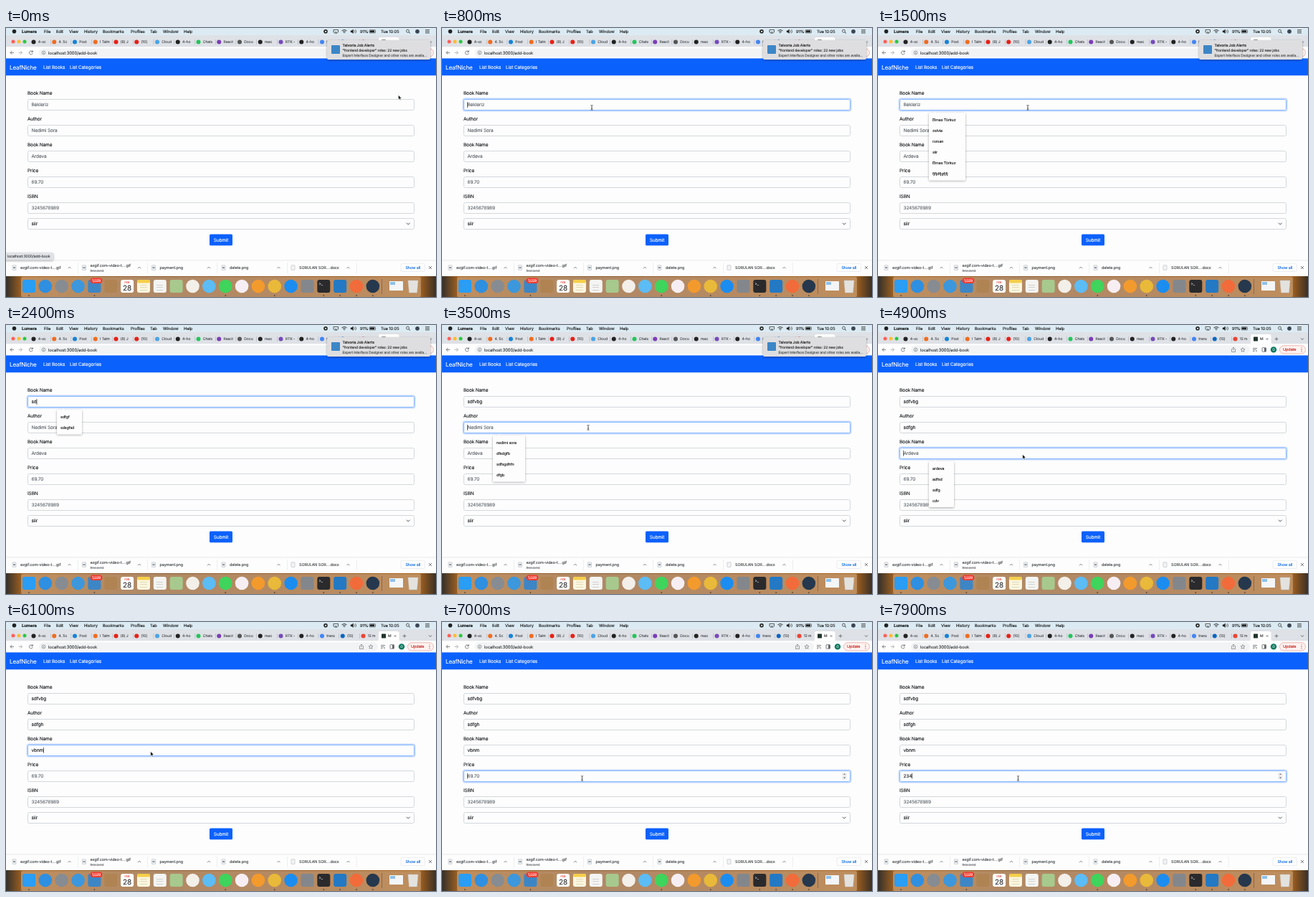
Write an HTML page that moves like this. It is 600 px wide and 375 px high and loops after 8 s.

```html
<!DOCTYPE html>
<html lang="en">
<meta charset="utf-8">
<title>Add book</title>
<style>
html, body { margin: 0; width: 100%; height: 100%; overflow: hidden; background: #fdfdfd }
svg { display: block; width: 100vw; height: 100vh }
text {
  font-family: Inter, Roboto, "Liberation Sans", sans-serif;
  letter-spacing: -.02em; white-space: pre; text-rendering: geometricPrecision;
}
</style>
<svg id="stage" viewBox="0 0 600 375">
  <defs>
    <linearGradient id="wall">
      <stop offset="0" stop-color="#33302c"/><stop offset=".04" stop-color="#a8641f"/>
      <stop offset=".35" stop-color="#8a5a30"/><stop offset=".7" stop-color="#9a5d26"/>
      <stop offset=".96" stop-color="#a8641f"/><stop offset="1" stop-color="#3a2f25"/>
    </linearGradient>
    <filter id="shade" x="-20%" y="-20%" width="140%" height="150%">
      <feDropShadow dx="0" dy="1" stdDeviation="1.5" flood-opacity=".35"/>
    </filter>
  </defs>
  <g id="base"></g><g id="live"></g>
</svg>
<script>
const $ = id => document.getElementById(id);
const BLUE = '#0b61fb', INK = '#16191c', GREY = '#5f6368';

// y is the vertical middle of the line; the thin stroke firms up small type
const T = (x, y, s, size = 6.5, fill = INK, more = '') =>
  `<text x="${x}" y="${y + size * .36}" font-size="${size}" fill="${fill}" stroke="${fill}" stroke-width=".12" ${more}>${s}</text>`;
const R = (x, y, w, h, fill, r = 0, more = '') =>
  `<rect x="${x}" y="${y}" width="${w}" height="${h}" rx="${r}" fill="${fill}" ${more}/>`;
const C = (x, y, r, fill, more = '') => `<circle cx="${x}" cy="${y}" r="${r}" fill="${fill}" ${more}/>`;
const P = (d, stroke = GREY, w = .8, fill = 'none', more = '') =>
  `<path d="${d}" stroke="${stroke}" stroke-width="${w}" fill="${fill}" ${more}/>`;
const loop = (list, f) => list.map(f).join('');

function menuBar() {
  const items = [[53, 'File'], [70, 'Edit'], [88, 'View'], [109, 'History'], [135, 'Bookmarks'],
    [174, 'Profiles'], [201, 'Tab'], [219, 'Window'], [248, 'Help'], [494, '91%'], [523, 'Tue 10:05']];
  return R(0, 0, 600, 10, '#dcebf3') + C(11.5, 4.8, 2.8, '#222') +
    T(22, 4.8, 'Lumera', 5.9, '#111', 'font-weight="700"') +
    loop(items, ([x, s]) => T(x, 4.8, s, 5.8, '#111')) +
    C(446, 4.8, 2.8, '#222') + P('M445.2 3.4L447.8 4.8 445.2 6.2Z', 'none', 0, '#fff') +
    P('M458 6H457V2.5H463.5V6H462.5M458.5 7.2L460.2 5 462 7.2Z', '#222', .7) +
    P('M468.5 3.8Q472 1 475.5 3.8M470 5.4Q472 3.8 474 5.4M471.3 6.7H472.7', '#222', .9) +
    P('M481 3.7H482.5L484.5 2V7.5L482.5 6H481Z', '#222', .4, '#222') +
    P('M486 3.2Q487.5 4.8 486 6.4M487.5 2.2Q490 4.8 487.5 7.4', '#222', .6) +
    R(507, 2.7, 8.5, 4.2, 'none', .8, 'stroke="#222" stroke-width=".6"') + R(507.8, 3.4, 6.3, 2.8, '#222') +
    C(560.5, 4.2, 2, 'none', 'stroke="#222" stroke-width=".7"') + P('M562 5.7L564 7.6', '#222', .9) +
    C(574, 4.8, 2.9, '#3b4554') + P('M585 2.7H591M585 4.8H591M585 6.9H591', '#222', .8);
}

function tabs() {
  const names = ['4-sc', '4. Sc', 'Post', 'I Talm', '(8) J', '(10)', 'Cloud', '4-ho', 'Chats', 'React',
    'Docu', 'reac', 'RTK -', '4-ho', 'trans', '(12)', '12 m'];
  const tints = ['#222', '#ef6c1f', '#1683d8', '#ef6c1f', '#e62117', '#e62117', '#4aa3e8', '#222', '#25c55b',
    '#7a3db8', '#555', '#222', '#764abc', '#222', '#4285f4', '#0a66c2', '#ea4335'];
  const step = 28.75;
  return R(0, 10, 600, 16.5, '#dee1e6') +
    loop(['#ff5f57', '#febc2e', '#28c840'], (c, i) => C(10 + i * 8, 19, 2.5, c)) +
    loop(names, (s, i) => C(38.5 + i * step, 19.5, 3, tints[i]) + T(44.8 + i * step, 19.5, s, 5.1, '#45494d') +
      (i < 16 ? R(62 + i * step, 16, .4, 7, '#9aa0a6') : '')) +
    P('M517.5 26.5Q520 26.5 520 24V15.5Q520 13 522.5 13H546Q548.5 13 548.5 15.5V24Q548.5 26.5 551 26.5Z', 'none', 0, '#fff') +
    R(524, 16.5, 6, 6, '#20332c', .6) + T(533, 19.5, 'M', 5.1, '#333') +
    P('M541.5 18L544.5 21M544.5 18L541.5 21', '#555', .6) +
    P('M553.5 19.5H558.5M556 17V22', '#555', .7) + P('M590 18.5L592 20.5 594 18.5', '#444', .8);
}

function toolBar() {
  return R(0, 26.3, 600, 16.4, '#fdfdfd') + R(46, 28.5, 473, 11.8, '#f1f3f4', 5.9) +
    P('M11 34.4H6M8.3 32L6 34.4 8.3 36.8', GREY, .8) + P('M17.5 34.4H22.5M20.2 32L22.5 34.4 20.2 36.8', '#a5a8ac', .8) +
    P('M37 33A2.5 2.5 0 1 0 37.3 35.2M37.4 31.3V33.4H35.2', GREY, .8) +
    C(52.5, 34.4, 2.4, 'none', `stroke="${GREY}" stroke-width=".6"`) + P('M52.5 34V35.8M52.5 32.9V33.4', GREY, .7) +
    T(59, 34.4, 'localhost:3000/add-book', 5.9, '#303438') +
    P('M494.5 33.5H493.5V37.5H498.5V33.5H497.5M496 35.5V31.2M494.6 32.5L496 31 497.4 32.5', GREY, .6) +
    P('M509 31.5L509.9 33.5 512 33.7 510.4 35.1 510.9 37.2 509 36.1 507.1 37.2 507.6 35.1 506 33.7 508.1 33.5Z', GREY, .6) +
    P('M523 32.5H529M523 34.5H527M523 36.5H525.5M528 34.5V37.5', GREY, .8) +
    R(536, 31.7, 5.5, 5.5, 'none', .6, `stroke="${GREY}" stroke-width=".8"`) + R(539, 32, 2.2, 5, GREY) +
    C(552, 34.4, 4.2, '#0b7a60') + T(552, 34.4, 'O', 4.6, '#fff', 'text-anchor="middle"') +
    R(560.5, 28.8, 36, 11.2, '#fdf3f1', 5.6, 'stroke="#e08a80" stroke-width=".6"') +
    T(565, 34.4, 'Update', 5.6, '#c5221f') + loop([32, 34.4, 36.8], y => C(591, y, .6, '#c5221f'));
}

function downloads() {
  const files = [[20, 'ezgif.com-video-t....gif'], [117.5, 'ezgif.com-video-t....gif'], [214.5, 'payment.png'],
    [312, 'delete.png'], [409, 'SORULAN SOR....docx']];
  return R(0, 324, 600, 22, '#fdfdfd') + R(0, 323.7, 600, .5, '#d0d3d6') +
    loop(files, ([x, s], i) => R(x - 11, 330.8, 5, 6.6, '#f3f4f5', .4, 'stroke="#a9adb2" stroke-width=".5"') +
      (i < 4 ? R(x - 10, 333, 3, 2.2, '#8d9aa5') : '') +
      T(x, i == 1 ? 330.6 : 334.2, s, 5.45, '#3c4043') + (i == 1 ? T(x, 338.8, 'Removed', 4.4, GREY) : '') +
      P(`M${x + 66.5} 335.2l2 -2 2 2`, GREY, .8) + R(x + 80, 327, .4, 15, '#d5d8db')) +
    R(551, 328.3, 33.5, 11.2, '#fdfdfd', 2, 'stroke="#dadce0" stroke-width=".5"') +
    T(557.5, 334, 'Show all', 5.4, '#1a73e8', 'font-weight="500"') +
    P('M590 332L594 336M594 332L590 336', GREY, .8);
}

function dock() {
  // a leading "o" makes the tile round
  const tints = ['#2a9df4', 'o#2f8fe0', 'o#878c92', 'o#3c97dc', '#3d86c6', '#b08352', '#fff', '#fbf6e0', '#f4f4f2', '#a7c98d',
    'o#f3efe9', 'o#5cbcf5', 'o#3fd45c', 'o#f6eef2', 'o#f39a2d', 'o#e9b93a', 'o#1b8df0', '#83878c', '#2a2a2c', '#2379c4',
    'o#f26b3a', 'o#26384d'];
  const running = [0, 4, 12, 15, 18, 19, 20, 21];
  return R(0, 346, 600, 29, 'url(#wall)') + R(21, 347, 558, 28, '#d6b79c', 2, 'opacity=".5"') +
    loop(tints, (c, i) => {
      const x = 32 + i * 22.85;
      return (c[0] == 'o' ? C(x, 360, 9.3, c.slice(1)) : R(x - 9, 351, 18, 18, c, 3)) +
        (running.includes(i) ? C(x, 373, .8, '#222') : '');
    }) +
    R(117.5, 348.5, 17, 7.5, '#f23b30', 3.7) + T(126, 352.2, '1,029', 5, '#fff', 'text-anchor="middle"') +
    T(169, 354.5, 'FEB', 3.8, '#e0352b', 'text-anchor="middle"') +
    T(169, 362, '28', 10, '#333', 'text-anchor="middle"') +
    R(183, 351, 18, 4.5, '#f5cf4b', 2) +
    loop([358, 361.5, 365], y => R(187, y, 10, .5, '#c9bd8b') + R(210, y, 9, .5, '#aaa')) +
    T(436.5, 356, '&gt;_', 5, '#eee') +
    R(524, 350, .5, 21, '#5d4640') + R(535, 353, 19, 13, '#f3f5f7', .6) + R(536, 354, 7, 4, '#8fc0ea') +
    P('M561 352H575L573.5 369H562.5Z', '#c9cfd3', .5, '#e8ecee', 'opacity=".9"');
}

const rows = [['Book Name', 'Bekleriz'], ['Author', 'Nedimi Sora'], ['Book Name', 'Ardeva'],
  ['Price', '69.70'], ['ISBN', '3245678989']];
const rowY = i => 107.1 + i * 35.85;

// borders sit on whole pixels
function field(y, focus) {
  const top = Math.round(y - 7.9) + .5;
  return (focus ? R(29.3, top - 1.2, 541.4, 17.4, 'none', 3, 'stroke="#c2d8fe" stroke-width="1.6"') : '') +
    R(30.5, top, 539, 15, '#fdfdfd', 2, `stroke="${focus ? '#86b7fe' : '#d3d8dc'}"`);
}

$('base').innerHTML = R(0, 0, 600, 375, '#fdfdfd') + menuBar() + tabs() + toolBar() +
  R(0, 42.4, 600, 23.8, BLUE) + T(5, 54.6, 'LeafNiche', 8.1, '#fff') +
  T(52, 54.6, 'List Books', 6.5, '#fff') + T(89, 54.6, 'List Categories', 6.5, '#fff') +
  loop(rows, ([label], i) => T(30, rowY(i) - 16.1, label)) +
  field(272.8) + T(35.5, 272.8, 'siir') + P('M559 271.7L561.3 274 563.6 271.7', '#343a40', .9) +
  R(284, 287.5, 32, 15.8, BLUE, 1.6) + T(300, 295.4, 'Submit', 6.5, '#fff', 'text-anchor="middle"') +
  downloads() + dock();

// hints[n] = popup width and suggestions once n letters are typed
const edits = [
  { row: 0, at: 800, text: 'sdfvbg', keys: [2000, 2200, 2500, 2650, 2800, 2950], open: 1000, hints: [
    [51, 'Elmas Törkuz', 'zelvia', 'roman', 'siir', 'Elmas Törkuz', 'fjfjdfjgfjfj'],
    [35, 'siir', 'sdfgf', 'sdsgfsd'], [35, 'sdfgf', 'sdsgfsd'], [35, 'sdfgf']] },
  { row: 1, at: 3300, text: 'sdfgh', keys: [3750, 3900, 4050, 4200, 4350], open: 3400, hints: [
    [45, 'nedimi sora', 'dfsdgfb', 'sdfsgdhfn', 'dfgb'], [45, 'sdfsgdhfn'], [45, 'sdfsgdhfn'], [45, 'sdfsgdhfn']] },
  { row: 2, at: 4750, text: 'vbnm', keys: [5250, 5450, 5650, 5850], open: 4800, hints: [
    [35, 'ardeva', 'adfsd', 'sdfg', 'cdv']] },
  { row: 3, at: 6700, text: '234', keys: [7250, 7450, 7650], hints: [] }
];

// time, x, y
const path = [[0, 547.5, 93.5], [150, 547.5, 93.5], [700, 209, 111], [3000, 209, 111], [3250, 204, 143],
  [4400, 204, 143], [4650, 201.8, 180.5], [6250, 201.8, 180.5], [6550, 195.5, 218], [8000, 195.5, 218]];
const between = (t, a, b) => t >= a && t < b;
const ease = p => p * p * (3 - 2 * p);

function pointer(t) {
  if (between(t, 2000, 3000) || between(t, 3750, 4400)) return '';
  const k = path.findIndex(p => p[0] > t), [t0, x0, y0] = path[k - 1], [t1, x1, y1] = path[k];
  const p = ease((t - t0) / (t1 - t0)), at = `transform="translate(${x0 + (x1 - x0) * p} ${y0 + (y1 - y0) * p})"`;
  const beam = between(t, 600, 4400) || t > 6480;
  return beam ? P('M-1.5 -3.4Q0 -3.4 0 -2.4V2.4Q0 3.4 -1.5 3.4M1.5 -3.4Q0 -3.4 0 -2.4M0 2.4Q0 3.4 1.5 3.4M-.8 .9H.8', '#222', .7, 'none', at)
    : P('M0 0V6.2L1.4 4.9 2.4 7.1 3.4 6.7 2.4 4.6H4.4Z', '#fff', .5, '#000', at);
}

function hintList(y, [w, ...items]) {
  const top = y + 11.2, h = items.length * 15 + 4;
  return R(71, top, w, h, '#fdfdfd', 1.2, 'filter="url(#shade)"') +
    P(`M77.5 ${top + .2}L80 ${top - 2.3} 82.5 ${top + .2}`, '#dcdfe2', .4, '#fdfdfd') +
    loop(items, (s, i) => T(76, top + 9.7 + i * 15, s, 5.3, '#111'));
}

function notice(t) {
  const p = Math.min(1, Math.max(0, (t - 4350) / 350));
  if (p == 1) return '';
  return `<g transform="translate(${155 * p * p} 0)">` +
    R(448, 17, 144, 27, '#dedee0', 2.5, 'filter="url(#shade)"') + R(454, 24, 12, 12, '#3d86c6', 1) +
    T(469.5, 24, 'Talvoria Job Alerts', 5.2, '#222', 'font-weight="500"') +
    T(469.5, 31, '"frontend developer" roles: 22 new jobs', 5, '#222') +
    T(469.5, 37.8, 'Expert Interface Designer and other roles are availa...', 4.9, '#444') + '</g>';
}

function draw(t) {
  const now = edits.filter(e => t >= e.at).pop();
  let out = '', popup = '', caret = false;
  rows.forEach(([, hint], i) => {
    const e = edits[i], y = rowY(i), focus = !!now && now.row == i;
    const n = e ? e.keys.filter(k => t >= k).length : 0;
    out += field(y, focus) + T(35.5, y, n ? e.text.slice(0, n) : hint, 6.5, n ? INK : '#5a6168', focus ? 'id="typed"' : '');
    if (!focus) return;
    const last = n ? e.keys[n - 1] : e.at;
    caret = (t - last) % 1000 < 500 && { y, n };
    if (i == 3) out += R(558, y - 5, 7, 10, '#efefef', 1) +
      P(`M560 ${y - 1.8}l1.5 -1.7 1.5 1.7ZM560 ${y + 1.8}l1.5 1.7 1.5 -1.7Z`, 'none', 0, '#555');
    if (t >= e.open && e.hints[n]) popup = hintList(y, e.hints[n]);
  });
  if (t < 500) out += R(-2, 313.3, 68, 10.2, '#dfe1e5', 1.5, 'filter="url(#shade)"') +
    T(2, 318.3, 'localhost:3000/add-book', 5.15, '#3c4043');
  $('live').innerHTML = out + (caret ? R(35.3, caret.y - 3.9, .6, 7.8, '#000', 0, 'id="caret"') : '') +
    popup + notice(t) + pointer(t);
  if (caret && caret.n) $('caret').setAttribute('x', 35.5 + $('typed').getComputedTextLength());
}

(function tick() {
  draw(performance.now() % 8000);
  requestAnimationFrame(tick);
})();
</script>
</html>
```
